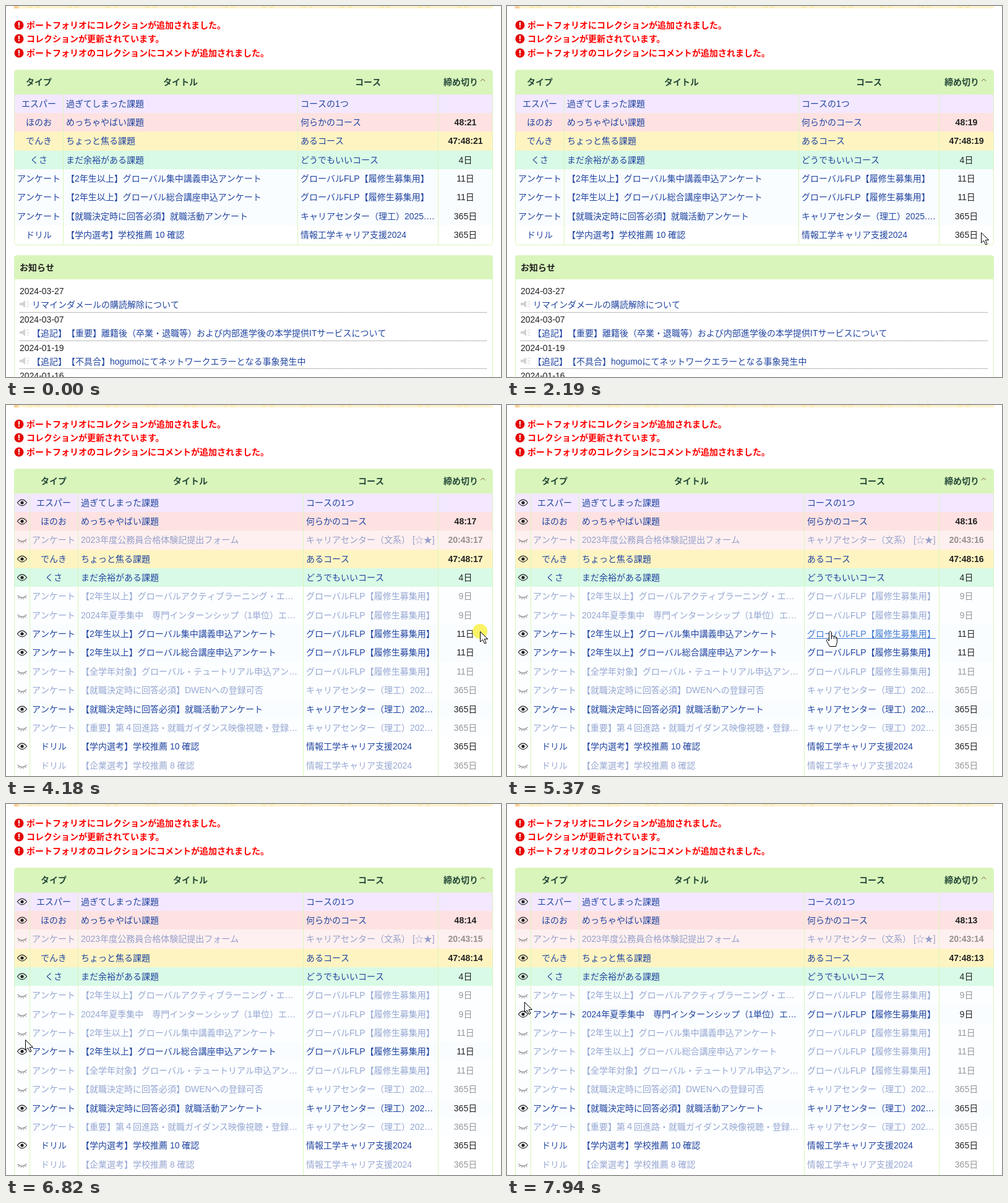
An HTML page with a canvas for the animation above (8000 ms loop, 800 px wide and 600 px high).

```html
<!DOCTYPE html>
<html lang="ja">
<head>
<meta charset="utf-8">
<style>
html, body { margin: 0; width: 100%; height: 100%; overflow: hidden; background: #fff; }
canvas { display: block; }
</style>
</head>
<body>
<canvas id="stage" width="800" height="600"></canvas>
<script>
const ctx = document.getElementById('stage').getContext('2d');
const LOOP = 8000, TOP = 143, ROW = 30.37;
const FAMILY = '14px "Liberation Sans", "Noto Sans CJK JP", sans-serif';
const GREEN = '#d9f5bb', INK = '#222', LINK = '#2145a0', HOVER = '#437bd0', PALE = '#fafdff';
const FLP = 'グローバルFLP【履修生募集用】', CAREER = 'キャリアセンター（理工）', JOHO = '情報工学キャリア支援2024';
const SURVEY = 'アンケート';

// type, title, course, deadline, background, shown in the short list
const rows = [
  ['エスパー', '過ぎてしまった課題', 'コースの1つ', '', '#f3e8ff', 1],
  ['ほのお', 'めっちゃやばい課題', '何らかのコース', '48:', '#fee2e2', 1],
  [SURVEY, '2023年度公務員合格体験記提出フォーム', 'キャリアセンター（文系） [☆★]', '20:43:', '#fee2e2', 0],
  ['でんき', 'ちょっと焦る課題', 'あるコース', '47:48:', '#fef4c2', 1],
  ['くさ', 'まだ余裕がある課題', 'どうでもいいコース', '4日', '#d9fae6', 1],
  [SURVEY, '【2年生以上】グローバルアクティブラーニング・エ…', FLP, '9日', PALE, 0],
  [SURVEY, '2024年夏季集中　専門インターンシップ（1単位）エ…', FLP, '9日', PALE, 0],
  [SURVEY, '【2年生以上】グローバル集中講義申込アンケート', FLP, '11日', PALE, 1],
  [SURVEY, '【2年生以上】グローバル総合講座申込アンケート', FLP, '11日', PALE, 1],
  [SURVEY, '【全学年対象】グローバル・テュートリアル申込アン…', FLP, '11日', PALE, 0],
  [SURVEY, '【就職決定時に回答必須】DWENへの登録可否', CAREER, '365日', PALE, 0],
  [SURVEY, '【就職決定時に回答必須】就職活動アンケート', CAREER, '365日', PALE, 1],
  [SURVEY, '【重要】第４回進路・就職ガイダンス映像視聴・登録…', CAREER, '365日', PALE, 0],
  ['ドリル', '【学内選考】学校推薦 10 確認', JOHO, '365日', '#fff', 1],
  ['ドリル', '【企業選考】学校推薦 8 確認', JOHO, '365日', '#fff', 0]
];
// the zero-width spaces keep neighbouring brackets at full width
const news = [
  ['2024-03-27', 'リマインダメールの購読解除について'],
  ['2024-03-07', '【追記】\u200b【重要】離籍後（卒業・退職等）および内部進学後の本学提供ITサービスについて'],
  ['2024-01-19', '【追記】\u200b【不具合】hogumoにてネットワークエラーとなる事象発生中'],
  ['2024-01-16', '']
];
const shortView = { type: 53, title: 97, course: 476, heads: [53, 282, 585], lines: [92, 471, 698], year: '2025.…' };
const fullView = { type: 77, title: 121, course: 485, heads: [77, 298, 590], lines: [38, 116, 480, 698], year: '202…' };

// pointer stops: time, x, y
const stops = [
  [1100, 37, 578], [1910, 755, 369], [2190, 766, 366], [5100, 766, 366],
  [5860, 217, 367], [6000, 140, 370], [6340, 26, 371], [6680, 26, 372],
  [6820, 31, 381], [6960, 28, 395], [7390, 27, 395], [7600, 26, 340],
  [7800, 26, 338], [7940, 28, 320]
];
const arrow = new Path2D('M0 0V16.5L4 13L7 19.5L9.5 18.5L6.7 12H12Z');
const hand = new Path2D('M-2 1Q0-2 2 1V7Q5 6 6 8Q8 7 9 9Q11 9 11 11V17L9 24H-1L-6 15Q-6 12-4 13L-2 15Z');
const knuckles = new Path2D('M2 7V12M6 8V12M9 9V12');
let mouse, overLink;

function pointer(t) {
  if (t < 1140) return null;
  const i = stops.findIndex(s => s[0] > t);
  if (i < 0) return stops[stops.length - 1].slice(1);
  const [t0, x0, y0] = stops[i - 1], [t1, x1, y1] = stops[i];
  const u = (t - t0) / (t1 - t0), long = Math.abs(x1 - x0) > 400;
  const k = long ? Math.sin(u * Math.PI / 2) * .5 + u * .5 : u;
  return [Math.round(x0 + (x1 - x0) * k), Math.round(y0 + (y1 - y0) * k)];
}
function box(x, y, w, h, color) {
  ctx.fillStyle = color;
  ctx.fillRect(x, y, w, h);
}
function circle(x, y, r, color) {
  ctx.fillStyle = color;
  ctx.beginPath();
  ctx.arc(x, y, r, 0, 7);
  ctx.fill();
}
function stroke(path, color, width = 1) {
  ctx.strokeStyle = color;
  ctx.lineWidth = width;
  ctx.stroke(typeof path === 'string' ? new Path2D(path) : path);
}
function text(s, x, y, color = INK, bold = false, align = 'left') {
  ctx.font = (bold ? 'bold ' : '') + FAMILY;
  ctx.textAlign = align;
  ctx.fillStyle = color;
  ctx.fillText(s, x, y);
}
function hovers(x, w, y) {
  const hit = mouse && mouse[0] >= x && mouse[0] <= x + w && Math.abs(mouse[1] - y) < 8;
  if (hit) overLink = true;
  return hit;
}
function link(s, x, y, center) {
  ctx.font = FAMILY;
  const w = ctx.measureText(s).width, left = center ? x - w / 2 : x;
  const hit = hovers(left, w, y - 5), color = hit ? HOVER : LINK;
  text(s, left, y, color);
  if (hit) box(left, y + 2, w, 1, color);
}
function panel(y, h, headH) {
  ctx.fillStyle = GREEN;
  ctx.beginPath();
  ctx.roundRect(13, y, 774, headH, [5, 5, 0, 0]);
  ctx.fill();
  ctx.beginPath();
  ctx.roundRect(13.5, y + .5, 773, h - 1, 5);
  ctx.strokeStyle = GREEN;
  ctx.lineWidth = 1;
  ctx.stroke();
}
function eye(y, open) {
  ctx.save();
  ctx.translate(26, y);
  if (open) {
    stroke('M-7.5 0Q-4-4.8 0-4.8T7.5 0Q4 4.8 0 4.8T-7.5 0Z', INK, 1.2);
    circle(0, 0, 2.6, INK);
  } else {
    stroke('M-7.5-1Q0 6 7.5-1M-4.5 1.5L-6.5 4M-1.5 2.5L-2 5.5M1.5 2.5L2 5.5M4.5 1.5L6.5 4', INK, 1.2);
  }
  ctx.restore();
}
function banner() {
  box(13, 0, 774, 4, '#fdf3cf');
  box(13, 0, 7, 4, '#fbcf94');
  for (let x = 48; x < 787; x += 63) stroke(`M${x - 13} 0l4 3l5-3M${x} 0l3 3l4-3`, '#f8e290');
}
function alerts() {
  ['ポートフォリオにコレクションが追加されました。',
   'コレクションが更新されています。',
   'ポートフォリオのコレクションにコメントが追加されました。'].forEach((s, i) => {
    const y = Math.round(31 + i * 22.4);
    circle(21, y, 7.5, '#e60000');
    box(20, y - 5, 2, 6, '#fff');
    box(20, y + 2, 2, 2, '#fff');
    text(s, 33, y + 5, '#f00', true);
  });
}
function isHidden(i, t) {
  if (i === 6) return t < 7740;
  if (i === 7) return t >= 6560;
  if (i === 8) return t >= 7200;
  return !rows[i][5];
}
function deadline(s, i, t) {
  if (!s.endsWith(':')) return s;
  const left = i === 2 ? 17 - Math.floor((t - 4180) / 1000) : 21 - Math.floor((t + 325) / 1005);
  return s + left;
}
function table(t, full) {
  const view = full ? fullView : shortView;
  const shown = rows.map((r, i) => i).filter(i => full || rows[i][5]);
  const edge = n => Math.floor(TOP + n * ROW);
  shown.forEach((i, n) => {
    ctx.globalAlpha = full && isHidden(i, t) ? .5 : 1;
    box(14, edge(n), 772, edge(n + 1) - edge(n), rows[i][4]);
  });
  ctx.globalAlpha = 1;
  const height = full ? 520 : 284;
  panel(103, height, 40);
  for (const x of view.lines) box(x, TOP, 1, height - 40, GREEN);
  ['タイプ', 'タイトル', 'コース'].forEach((s, i) => text(s, view.heads[i], 128, '#274a3a', true, 'center'));
  text('締め切り', 735, 128, '#274a3a', true, 'center');
  stroke('M767 121.5L770.5 118L774 121.5', '#7a4a3a');
  shown.forEach((i, n) => {
    const [type, title, course, due] = rows[i], mid = edge(n) + 15, base = mid + 5;
    const hide = full && isHidden(i, t);
    ctx.globalAlpha = hide ? .47 : 1;
    if (full) {
      hovers(18, 16, mid);
      eye(mid, !hide);
    }
    link(type, view.type, base, true);
    link(title, view.title, base);
    link(course === CAREER ? course + view.year : course, view.course, base);
    text(deadline(due, i, t), 742.5, base, INK, due.endsWith(':'), 'center');
  });
  ctx.globalAlpha = 1;
}
function notices() {
  panel(403, 240, 39);
  text('お知らせ', 22, 428, INK, true);
  news.forEach(([date, title], i) => {
    const y = Math.round(466 + i * 45.8), rule = Math.floor(495.2 + i * 45.8);
    text(date, 22, y);
    if (!title) return;
    link(title, 42, y + 22);
    ctx.fillStyle = '#d2d2d2';
    ctx.fill(new Path2D(`M22 ${y + 14}h4l5-4v12l-5-4h-4Z`));
    stroke(`M33 ${y + 13}l4-2M33 ${y + 16}h5M33 ${y + 19}l4 2`, '#d2d2d2');
    for (let x = 22; x < 778; x += 2) box(x, rule, 1, 1, '#777');
  });
}
function drawPointer(t) {
  if (!mouse) return;
  if (t >= 3120 && t < 4580) circle(...mouse, 12, 'rgba(252,238,20,.65)');
  ctx.save();
  ctx.translate(mouse[0] + .5, mouse[1] + .5);
  const shape = overLink ? hand : arrow;
  ctx.fillStyle = '#fff';
  ctx.fill(shape);
  stroke(shape, '#000');
  if (overLink) stroke(knuckles, '#000');
  ctx.restore();
}
function draw(now) {
  const t = now % LOOP, full = t >= 4180;
  mouse = pointer(t);
  overLink = false;
  box(0, 0, 800, 600, '#fff');
  banner();
  alerts();
  table(t, full);
  if (!full) notices();
  drawPointer(t);
}
const start = performance.now();
function tick() {
  draw(performance.now() - start);
  requestAnimationFrame(tick);
}
tick();
</script>
</body>
</html>
```
